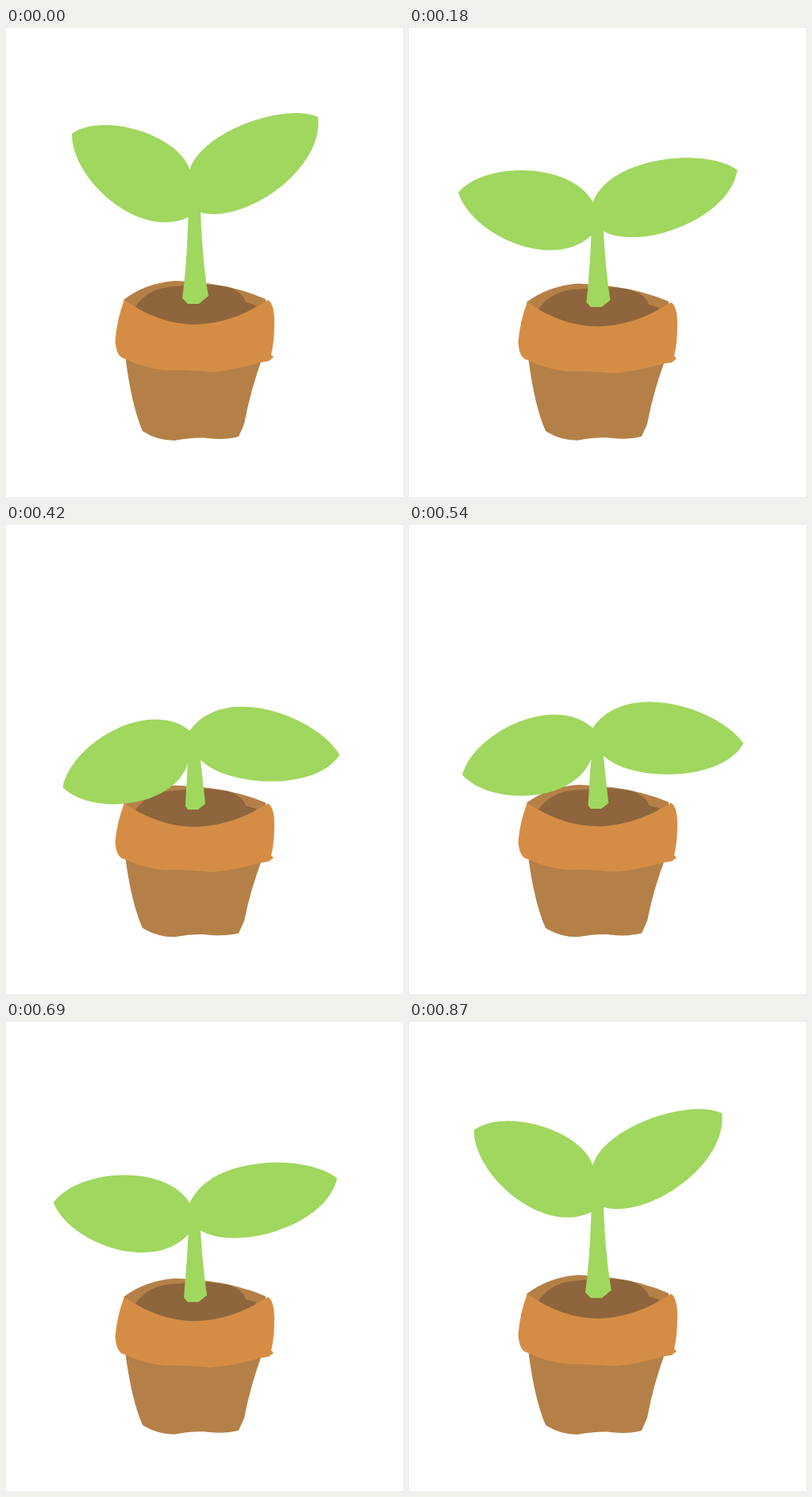
Write an HTML page that moves like this. It is 500x590 px and loops after 0.9 s.

```html
<!DOCTYPE html>
<html lang="en">
<head>
<meta charset="utf-8">
<title>Sprout</title>
<style>
  html, body { margin: 0; width: 100%; height: 100%; overflow: hidden; background: #fff; }
  svg { display: block; width: 100vw; height: 100vh; }
</style>
</head>
<body>
<svg viewBox="0 0 500 590">
  <g id="pot">
    <!-- back wall, body, soil, rim -->
    <path fill="#b58047" d="M148 342Q175 321 213 318Q280 320 327 341V400H170Z"/>
    <path fill="#b58047" d="M150 412Q158 475 172 507Q190 519 212 519Q232 515 250 515.5Q275 519 293 514L300 498Q308 455 324 412Z"/>
    <path fill="#8e653c" d="M162 352Q180 325 215 325Q250 320 280 326Q299 333 302 345L315 349L300 390H180Z"/>
    <path fill="#d58d45" d="M149 342Q193 373 238 373Q285 372 330 342Q338 347 338 370Q338 395 334 411L337 414L331 419L319 421Q285 431 258 433Q215 429 200 430.5Q170 427 150 416Q139 415 137.5 393Q140 365 149 342Z"/>
  </g>
  <path id="plant" fill="#a0d75f"/>
</svg>
<script>
const LOOP = 900, STEP = 30, PIVOT = 505;
const pot = document.getElementById('pot');
const plant = document.getElementById('plant');

// 0 = leaves raised, 1 = leaves drooping.
const droop = t => ((1 - Math.cos(2 * Math.PI * t / LOOP)) / 2) ** 0.93;

// Bulging leaf edge from a to b; g and h are its fullness near each end.
function edge(a, b, g, h) {
  const dx = b[0] - a[0], dy = b[1] - a[1];
  const at = (along, out) => [a[0] + dx * along + dy * out, a[1] + dy * along - dx * out];
  return `C${at(0.18, g)} ${at(0.82, h)} ${b}`;
}

function draw(t) {
  const u = droop(t);
  const leftTip = [83 - 83 * u + 72 * u * u, 133 + 199 * u];
  const rightTip = [393 + 72 * u - 45 * u * u, 112 + 179 * u];
  const fork = [231.5, 178 + 127 * u - 46 * u * u];
  const leftPit = [229.5, 238 + 62 * u];
  const rightPit = [245, 232 + 64 * u];
  const sink = 14 * u;

  plant.setAttribute('d', `M${leftPit}`
    + edge(leftPit, leftTip, 0.33, 0.26)
    + edge(leftTip, fork, 0.24 + 0.02 * u, 0.25 + 0.09 * u)
    + edge(fork, rightTip, 0.22 + 0.14 * u, 0.19 + 0.03 * u)
    + edge(rightTip, rightPit, 0.29 - 0.03 * u, 0.25 - 0.05 * u)
    + `Q${248 - u},${300 + sink} ${255 - 4 * u},${337 + sink}`
    + `L${243 - u},${347 + 11 * u} ${229},${347 + 11 * u} ${222 + 4 * u},${340 + sink}`
    + `Q${228},${295 + sink} ${leftPit}Z`);

  pot.setAttribute('transform',
    `translate(0 ${PIVOT}) scale(1 ${1 - 0.051 * u}) translate(0 ${-PIVOT})`);
}

const start = performance.now();
function tick() {
  const t = (performance.now() - start) % LOOP;
  draw(Math.floor(t / STEP) * STEP);
  requestAnimationFrame(tick);
}
tick();
</script>
</body>
</html>
```
